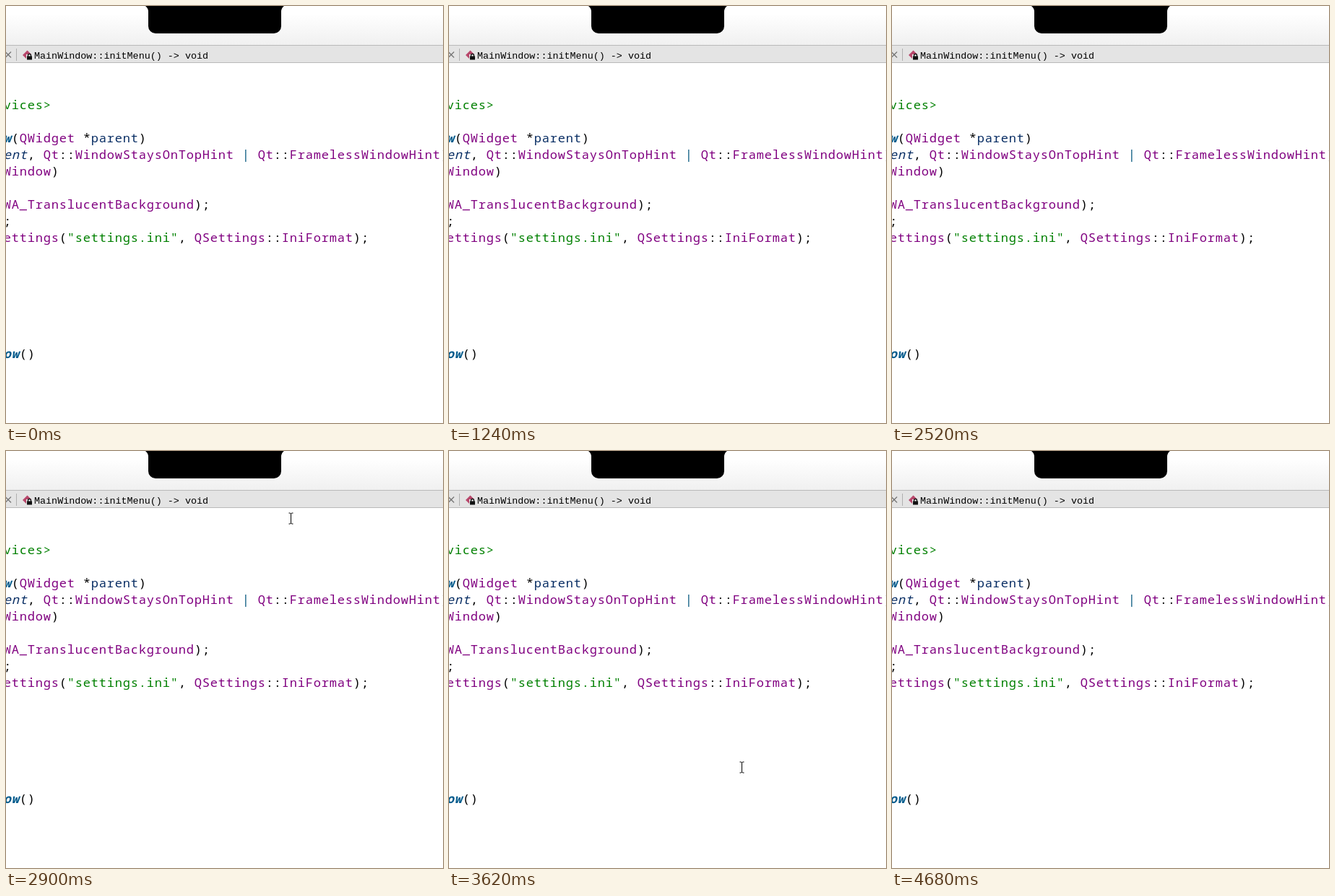
Animation of 605 by 578 pixels, one loop 4.88 s. Source, as an HTML page:

```html
<!DOCTYPE html>
<html lang="en">
<head>
<meta charset="utf-8">
<title>Notch settings</title>
<style>
html, body { margin: 0; width: 100%; height: 100%; overflow: hidden; background: #fff; }
svg { display: block; width: 605px; height: 578px; }
text { white-space: pre; }
#code text { font: 17px "Noto Sans Mono", "DejaVu Sans Mono", monospace; letter-spacing: .8px; fill: #000; }
.ui { font: 13.4px "Liberation Mono", monospace; fill: #000; }
.str { fill: #008000; }
.type { fill: #800080; }
.arg { fill: #092e64; }
.it { fill: #092e64; font-style: italic; }
.op { fill: #00557c; }
.fn { fill: #005a8c; font-weight: 700; font-style: italic; }
</style>
</head>
<body>
<svg viewBox="0 0 605 578">
  <defs>
    <linearGradient id="fade" x2="0" y2="1">
      <stop offset=".2" stop-color="#fff"/>
      <stop offset="1" stop-color="#f0f0f0"/>
    </linearGradient>
    <filter id="shade" x="-10%" y="-10%" width="120%" height="120%">
      <feGaussianBlur stdDeviation="5"/>
    </filter>
  </defs>
  <rect width="605" height="578" fill="#fff"/>
  <rect width="605" height="54" fill="url(#fade)"/>
  <rect y="54" width="605" height="25" fill="#e4e4e4"/>
  <path d="M0 54.5H605M0 78.5H605" stroke="#b9b9b9"/>
  <path d="M-1 63.5l8 8m0 -8l-8 8" stroke="#777" stroke-width="1.3"/>
  <path d="M14.5 59V76" stroke="#b0b0b0"/>
  <path d="M23 68l6.500 -6.500l6.500 6.500l-6.500 6.500z" fill="#b8476b"/>
  <rect x="28" y="67" width="9" height="8" fill="#e4e4e4"/>
  <path d="M30.5 70v-1.500a2 2 0 0 1 4 0v1.500" fill="none" stroke="#111" stroke-width="1.3"/>
  <rect x="29" y="69.5" width="7" height="5" fill="#111"/>
  <text class="ui" x="39" y="73">MainWindow::initMenu() -&gt; void</text>
  <g id="code"></g>
  <path d="M193 0H385A10 10 0 0 0 381 8V28A10 10 0 0 1 371 38H207A10 10 0 0 1 197 28V8A10 10 0 0 0 193 0Z"/>

  <g id="dialog">
    <rect x="87" y="333" width="404" height="270" fill="#000" opacity=".33" filter="url(#shade)"/>
    <rect x="88" y="331" width="402" height="260" fill="#f0f0f0"/>
    <path d="M88.5 331V578M489.5 331V578" stroke="#8db4d3"/>
    <rect x="88" y="331" width="402" height="38" fill="#0078d7"/>
    <rect x="99" y="343" width="18" height="14" fill="#f4f4f4"/>
    <rect x="100.5" y="345" width="8" height="10.5" fill="#3f7a5c"/>
    <rect x="110" y="345" width="5.5" height="10.5" fill="#c9d2d6"/>
    <g fill="#fff" font-family="Open Sans, Noto Sans, sans-serif" font-size="15.5">
      <text x="123" y="356">Settings</text>
      <text x="398" y="356">?</text>
    </g>
    <path d="M453 344l12 12m0 -12l-12 12" stroke="#fff" stroke-width="1.2"/>
    <g class="ui">
      <text x="99" y="393">Window Size:</text>
      <text x="470" y="418">8</text>
      <text x="99" y="442">Aspect Ratio:</text>
      <text x="99" y="490">Corner Diam Ratio:</text>
      <text x="121" y="540">Fixed Position</text>
      <text x="121" y="565">Hide Cursor</text>
    </g>
    <rect x="100.5" y="409.5" width="363" height="3" fill="#e7eaea" stroke="#d6d6d6"/>
    <rect x="112" y="401" width="12" height="21" fill="#007ad9"/>
    <g id="spins"></g>
    <rect x="100.5" y="526.5" width="15" height="15" fill="#fff" stroke="#333"/>
    <rect id="box" x="100.5" y="551.5" width="15" height="15" fill="#fff"/>
    <path id="tick" d="M103.5 559l3.300 3.500l6.200 -7" fill="none" stroke-width="1.4"/>
  </g>

  <path id="arrow" d="M.5 .5v16l3.700 -3.500l2.500 5.700l2.300 -1l-2.500 -5.500h5.300z" fill="#fff" stroke="#000"/>
  <path id="beam" d="M-3 -7.500H-1L0 -6.500L1 -7.500H3M0 -6.500V6.500M-3 7.500H-1L0 6.500L1 7.500H3" fill="none" stroke="#000"/>
</svg>
<script>
const LOOP = 4880;
const REST = 282;
const el = id => document.getElementById(id);
const esc = s => s.replace(/</g, "&lt;").replace(/>/g, "&gt;");

// Coloured spans are written as [class:text].
const code = `[str:vices>]

[fn:w]([type:QWidget] *[arg:parent])
[it:ent], [type:Qt]::[type:WindowStaysOnTopHint] [op:|] [type:Qt]::[type:FramelessWindowHint])
[type:Window])

[type:WA_TranslucentBackground]);
;
[type:ettings]([str:"settings.ini"], [type:QSettings]::[type:IniFormat]);






[fn:ow]()`;
el("code").innerHTML = code.split("\n").map((line, row) => {
  const spans = esc(line).replace(/\[(\w+):([^\]]+)\]/g, '<tspan class="$1">$2</tspan>');
  return `<text x="-3.2" y="${143 + 23 * row}">${spans}</text>`;
}).join("");

const spin = (y, value) => `
  <rect x="99.5" y="${y + .5}" width="378" height="20" fill="#fff" stroke="#7a7a7a"/>
  <text class="ui" x="103" y="${y + 16}">${value}</text>
  <path d="M461.5 ${y + 2.5}h15v8h-15zm0 8h15v8h-15z" fill="#f0f0f0" stroke="#acacac"/>
  <path d="M465 ${y + 8.5}h8l-4 -4zm0 4h8l-4 4z"/>`;
el("spins").innerHTML = spin(450, "5.150") + spin(498, "0.280");

// Pointer moves: start, end, then the place it reaches.
const moves = [
  [80, 600, 372, 14],
  [600, 630, REST, 18],
  [2640, 2860, 394, 93],
  [2930, 3200, 211, 552],
  [3320, 3420, 330, 610],
  [3430, 3580, 420, 610],
  [3580, 3960, REST, 18],
  [4510, 4740, 225, 640]
];
// Short trips out of the notch: start, end, reach to the right or left.
const peeks = [[640, 670, -10], [965, 1240, 77], [1495, 1800, -77], [1995, 2200, 36]];

const ramp = (t, from, to) => Math.min(1, Math.max(0, (t - from) / (to - from)));
const show = (node, on) => node.setAttribute("visibility", on ? "visible" : "hidden");

function pointer(t) {
  let x = 390, y = 640;
  for (const [from, to, nx, ny] of moves) {
    const u = ramp(t, from, to);
    x += (nx - x) * u;
    y += (ny - y) * (1 - (1 - u) ** 3);
  }
  for (const [from, to, reach] of peeks)
    if (t > from && t < to)
      x = (reach > 0 ? 381 : 197) + reach * Math.sin(Math.PI * ramp(t, from, to));
  // One full swing across the notch.
  x -= 134 * Math.sin(2 * Math.PI * ramp(t, 3980, 4500));
  return [x, y];
}

function draw(t) {
  const [x, y] = pointer(t);
  const alpha = ramp(t, 2990, 3070) - ramp(t, 3550, 3610);
  const hide = t < 3290;
  const inNotch = x >= 197 && x <= 381 && y < 38;
  const inDialog = alpha > 0 && x > 88 && x < 490 && y > 331;
  const editing = y > 79 && !inDialog;

  el("dialog").setAttribute("opacity", alpha);
  show(el("dialog"), alpha > 0);
  const hover = x >= 100 && x < 216 && y > 550 && y < 568;
  for (const id of ["box", "tick"])
    el(id).setAttribute("stroke", hover ? "#0078d7" : "#333");
  show(el("tick"), hide && alpha > 0);

  show(el("arrow"), !editing && !(hide && inNotch));
  show(el("beam"), editing);
  const place = `translate(${Math.round(x)} ${Math.round(y)})`;
  el("arrow").setAttribute("transform", place);
  el("beam").setAttribute("transform", place + " translate(.5 .5)");
}

const start = performance.now();
function tick(now) {
  draw(Math.max(0, now - start) % LOOP);
  requestAnimationFrame(tick);
}
draw(0);
requestAnimationFrame(tick);
</script>
</body>
</html>
```
